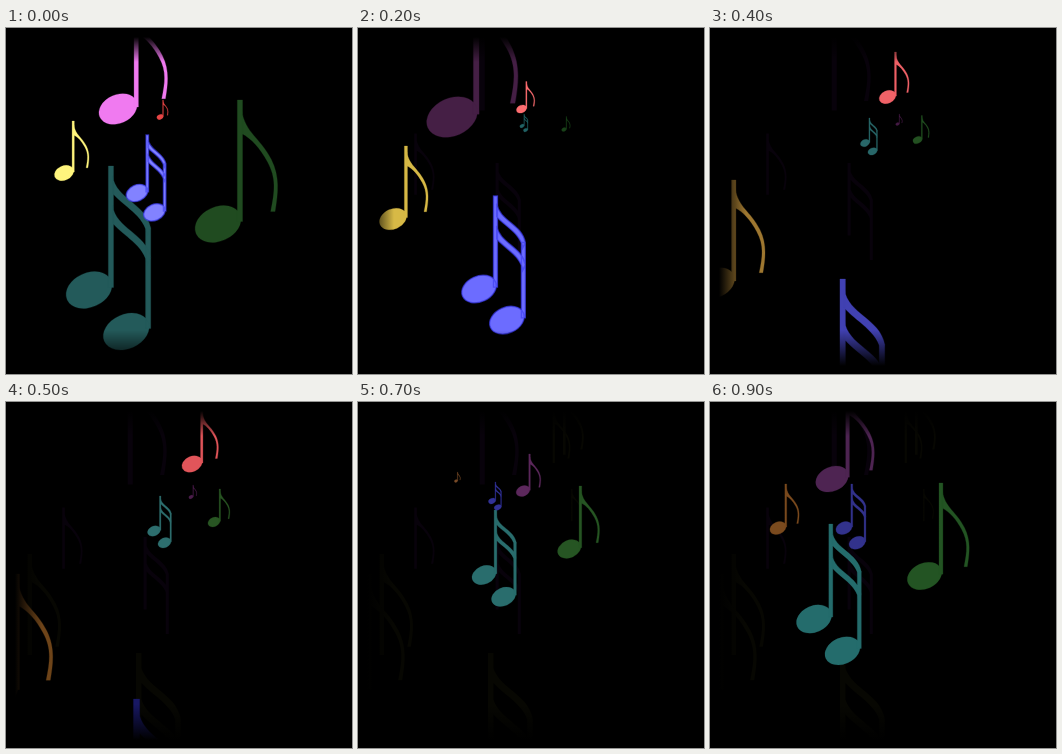
These frames come from a looping animation (346x346 px, 1 s). An HTML page with a canvas:

```html
<!DOCTYPE html>
<html lang="en">
<head>
<meta charset="utf-8">
<title>Floating notes</title>
<style>
html, body { margin: 0; height: 100%; overflow: hidden; background: #000; }
canvas { display: block; width: 100vw; height: 100vh; }
</style>
</head>
<body>
<canvas id="stage" width="346" height="346"></canvas>
<script>
const SIZE = 346, STEP = 100, STEPS = 10;
const ctx = document.getElementById('stage').getContext('2d');

// Shapes in units of the note height, relative to the centre of the first head.
const flag = new Path2D('M.19-.92C.22-.73 .34-.7 .43-.52C.5-.38 .485-.25 .46-.1L.425-.1C.46-.27 .47-.37 .4-.5C.34-.61 .27-.69 .19-.73Z');
const beam = new Path2D('M.19-.92C.22-.73 .46-.7 .498-.5L.47-.44C.45-.6 .27-.68 .19-.78Z');

function addHead(path, x, y) {
  const rx = 0.193, ry = 0.138, tilt = -0.42;
  path.moveTo(x + rx * Math.cos(tilt), y + rx * Math.sin(tilt));
  path.ellipse(x, y, rx, ry, tilt, 0, Math.PI * 2);
}

function addStem(path, x, top, bottom) {
  path.rect(x - 0.021, top, 0.042, bottom - top);
}

function makeNote(double, heads) {
  const path = new Path2D();
  if (heads) addHead(path, 0, 0);
  addStem(path, 0.177, -1, -0.02);
  if (double) {
    if (heads) addHead(path, 0.3, 0.335);
    addStem(path, 0.477, -0.5, 0.31);
    path.addPath(beam);
    path.addPath(beam, new DOMMatrix([1, 0, 0, 1, 0, 0.24]));
  } else {
    path.addPath(flag);
  }
  return path;
}

const single = { full: makeNote(false, true), bare: makeNote(false, false) };
const pair = { full: makeNote(true, true), bare: makeNote(true, false) };

// Keys: step, x, y, height, colour. Steps past 9 continue into the next loop.
const pink = { shape: single, keys: [
  [3, 190, 97, 8, '#3c183c'], [5, 185, 95, 12, '#4b1e4b'], [7, 165, 89, 37, '#5c285c'],
  [9, 122, 77, 88, '#4e2452'], [10, 112, 81, 103, '#f07af0'], [11, 103, 85, 120, '#964b96'],
  [12, 94, 89, 137, '#451f45']] };
const yellow = { shape: single, keys: [
  [7, 98, 79, 9, '#784b28'], [9, 68, 126, 44, '#7a4a1e'], [10, 58, 145, 52, '#fff57d'],
  [12, 35, 191, 73, '#d7b946'], [13, 21, 220, 88, '#cdaa46'], [15, -10, 290, 118, '#6e4419']] };
const blue = { shape: pair, edge: '#3c3cf0', keys: [
  [7, 134, 99, 19, '#323296'], [9, 134, 126, 44, '#32328c'], [10, 131, 165, 58, '#8282ff'],
  [11, 126, 209, 74, '#7878ff'], [12, 121, 261, 93, '#6c6cff'], [13, 115, 317, 112, '#6a6aff'],
  [15, 104, 447, 150, '#181864']] };
const teal = { shape: pair, keys: [
  [1, 166, 95, 9, '#1e6464'], [3, 162, 101, 15, '#235f64'], [5, 148, 129, 35, '#2d6e6e'],
  [9, 104, 217, 95, '#246c6c'], [10, 83, 262, 124, '#235a5a']] };
const green = { shape: single, keys: [
  [1, 205, 99, 10, '#143714'], [3, 207, 104, 16, '#1e4b1e'], [5, 208, 120, 33, '#285523'],
  [9, 214.5, 174, 93, '#235423'], [10, 212, 196, 124, '#204b20']] };
const red = { shape: single, keys: [
  [0, 154, 89, 17, '#e64646'], [1, 158, 86, 20, '#ff6e6e'], [3, 169, 76, 35, '#ff6e73'],
  [5, 186, 62, 55, '#e1555a'], [6, 195, 54, 64, '#461a1e']] };
const notes = [pink, green, teal, blue, yellow, red];

// Faint afterglows: first visible step, note, its pose, colour.
const PLUM = '#08020b', OLIVE = '#070702';
const glows = [
  [2, pink, 11, PLUM], [2, yellow, 11, PLUM], [2, blue, 11, PLUM],
  [5, yellow, 14, OLIVE], [5, blue, 14, OLIVE],
  [7, yellow, 15, OLIVE], [7, red, 5, OLIVE], [7, red, 6, OLIVE], [7, green, 5, OLIVE]];

const mix = (a, b, t) => a + (b - a) * t;

function mixColor(a, b, t) {
  const part = (c, i) => parseInt(c.slice(i, i + 2), 16);
  return `rgb(${[1, 3, 5].map(i => Math.round(mix(part(a, i), part(b, i), t)))})`;
}

function poseAt(keys, step) {
  const i = keys.findIndex(k => k[0] >= step);
  if (i < 0 || step < keys[0][0]) return null;
  const b = keys[i], a = keys[Math.max(0, i - 1)];
  const t = a === b ? 1 : (step - a[0]) / (b[0] - a[0]);
  return {
    x: mix(a[1], b[1], t), y: mix(a[2], b[2], t), h: mix(a[3], b[3], t),
    color: mixColor(a[4], b[4], t)
  };
}

function drawNote({ shape, edge, keys }, step, glow) {
  const pose = poseAt(keys, step);
  if (!pose) return;
  ctx.save();
  ctx.translate(pose.x, pose.y);
  ctx.scale(pose.h, pose.h);
  ctx.fillStyle = glow || pose.color;
  ctx.fill(glow ? shape.bare : shape.full);
  if (!glow) {
    const lit = edge && step >= STEPS && step < 14;
    ctx.strokeStyle = lit ? edge : pose.color;
    ctx.globalAlpha = lit ? 0.65 : 0.25;
    ctx.lineWidth = (lit ? 1.4 : 1) / pose.h;
    ctx.stroke(shape.full);
  }
  ctx.restore();
}

// Black at (x0, y0), clearing towards (x1, y1).
function fade(x0, y0, x1, y1) {
  const g = ctx.createLinearGradient(x0, y0, x1, y1);
  g.addColorStop(0, '#000');
  g.addColorStop(1, 'rgba(0,0,0,0)');
  ctx.fillStyle = g;
  ctx.fillRect(0, 0, SIZE, SIZE);
}

function draw(step) {
  ctx.fillStyle = '#000';
  ctx.fillRect(0, 0, SIZE, SIZE);
  for (const [from, note, at, tint] of glows) {
    if (step >= from) drawNote(note, at, tint);
  }
  for (const note of notes) {
    drawNote(note, step);
    drawNote(note, step + STEPS);
  }
  fade(0, 9, 0, 34);
  fade(9, 0, 36, 0);
  fade(0, 338, 0, 302);
}

function tick() {
  draw(Math.floor(performance.now() / STEP) % STEPS);
  requestAnimationFrame(tick);
}
tick();
</script>
</body>
</html>
```
